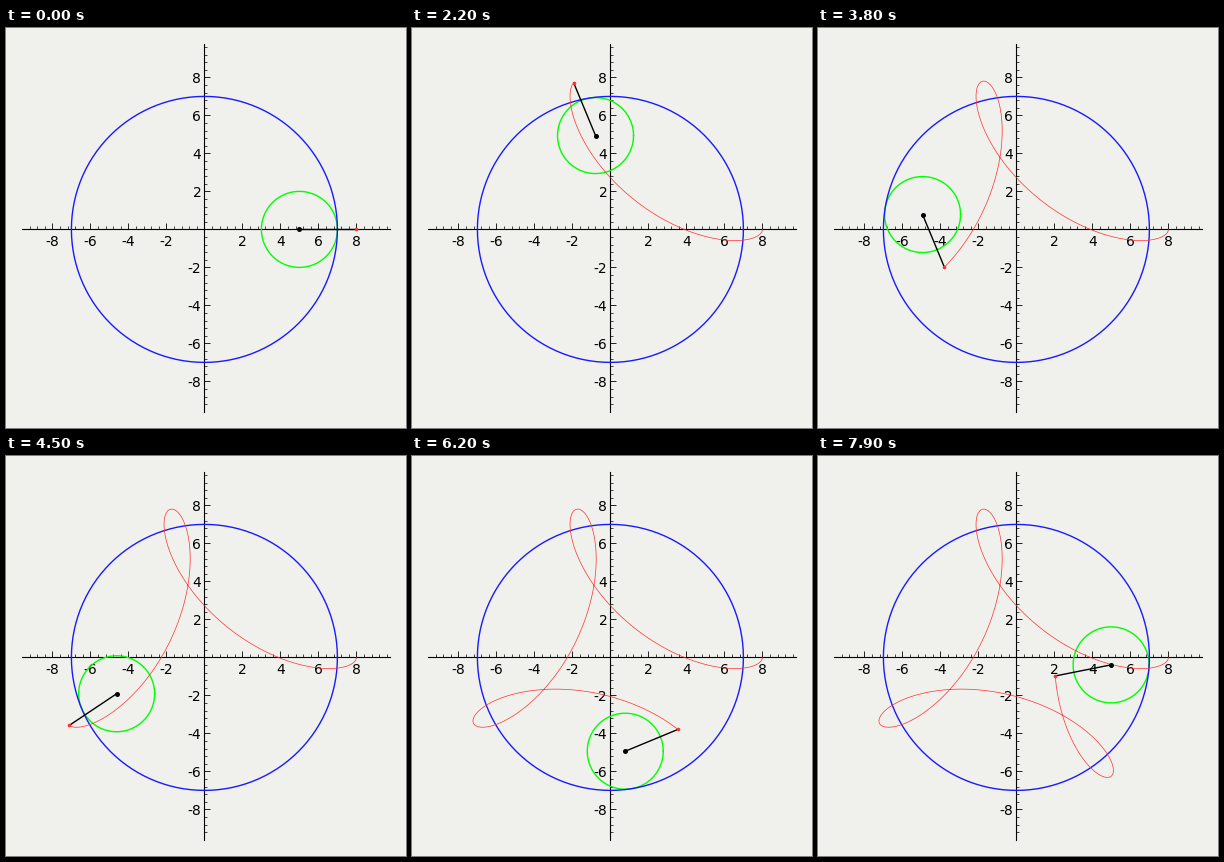
Animation of 400 by 400 pixels, one loop 8000 ms. Source, as a matplotlib script:

```python
import numpy as np
import matplotlib.pyplot as plt
from matplotlib.animation import FuncAnimation

R, r, d = 7, 2, 3            # fixed circle, rolling circle, pen arm
FRAMES, INTERVAL = 80, 100
SCALE, OX, OY = 19, 198.4, 201.4   # pixels per unit, origin from top left
LO, HI = 16, 384             # plot area in pixels

fig = plt.figure(figsize=(4, 4), dpi=100, facecolor="#f0f0ec")
ax = fig.add_axes([LO / 400, LO / 400, (HI - LO) / 400, (HI - LO) / 400],
                  frameon=True, facecolor="none")
ax.set_xlim((LO - OX) / SCALE, (HI - OX) / SCALE)
ax.set_ylim((OY - HI) / SCALE, (OY - LO) / SCALE)


def style_axes():
    for side in ("left", "bottom"):
        ax.spines[side].set_position("zero")
        ax.spines[side].set_linewidth(0.8)
    for side in ("right", "top"):
        ax.spines[side].set_visible(False)
    major = [v for v in range(-8, 9, 2) if v]
    minor = np.arange(-23, 25) * 0.4
    for axis, pad in ((ax.xaxis, 4), (ax.yaxis, 2.2)):
        lo, hi = axis.get_view_interval()
        axis.set_ticks(major, [str(v) for v in major])
        axis.set_ticks(minor[(minor > lo) & (minor < hi)], minor=True)
        axis.set_tick_params(which="major", direction="in", length=4,
                             width=0.6, pad=pad, labelsize=10)
        axis.set_tick_params(which="minor", direction="in", length=2,
                             width=0.5)


def stroke(x, y, width, color, z):
    return ax.plot(x, y, color=color, lw=width, zorder=z)[0]


def dot(size, color, z):
    return ax.plot([], [], "o", color=color, ms=size, mew=0, zorder=z)[0]


def center(t):
    return (R - r) * np.cos(t), (R - r) * np.sin(t)


def pen(t):
    x, y = center(t)
    a = (R - r) / r * t
    return x + d * np.cos(a), y - d * np.sin(a)


style_axes()
loop = np.linspace(0, 2 * np.pi, 241)
cos, sin = np.cos(loop), np.sin(loop)
stroke(R * cos, R * sin, 1, "#1a1aff", 4)
wheel = stroke([], [], 1, "#00ff00", 3)
trail = stroke([], [], 0.5, "#ff3030", 5)
arm = stroke([], [], 1, "black", 6)
hub = dot(3.6, "black", 7)
tip = dot(2.6, "#ff3030", 8)


def update(i):
    t = 2 * np.pi * i / FRAMES
    cx, cy = center(t)
    x, y = pen(t)
    wheel.set_data(cx + r * cos, cy + r * sin)
    trail.set_data(*pen(np.linspace(0, t, 6 * i + 2)))
    arm.set_data([cx, x], [cy, y])
    hub.set_data([cx], [cy])
    tip.set_data([x], [y])
    return wheel, trail, arm, hub, tip


anim = FuncAnimation(fig, update, frames=FRAMES, interval=INTERVAL,
                     repeat=True, repeat_delay=0)
plt.show()
```
